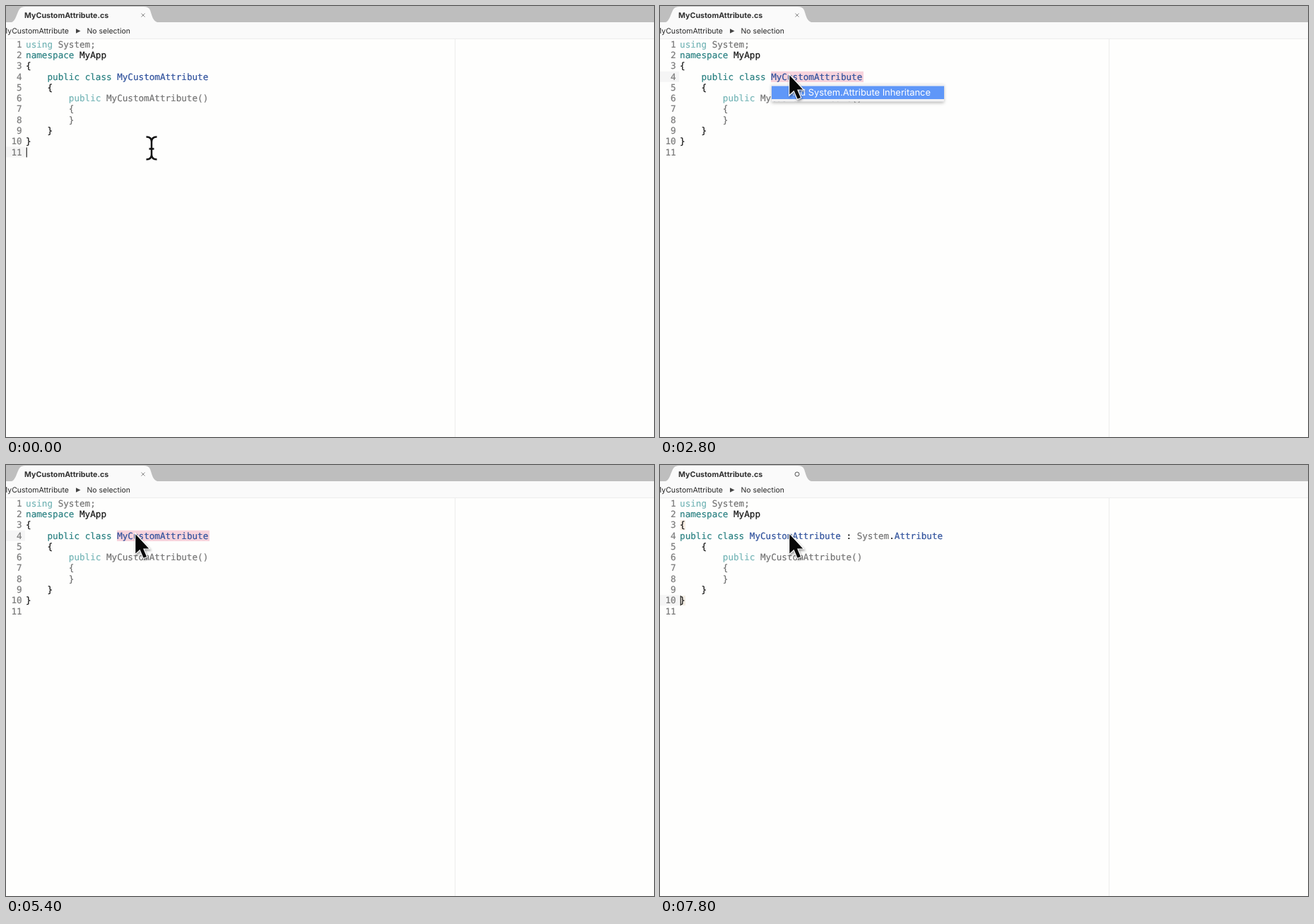
Recreate the animation shown at these times as an HTML page. Size 917 px wide and 611 px high, loop 8 s.

```html
<!DOCTYPE html>
<html lang="en">
<head>
<meta charset="utf-8">
<title>Code fix demo</title>
<style>
  html, body { margin: 0; width: 100%; height: 100%; overflow: hidden; background: #fefefd; }
  svg { display: block; width: 917px; height: 611px; }
  text { white-space: pre; text-rendering: geometricPrecision; font-family: Inter, "Open Sans", sans-serif; }
  .code { font: 12.62px "DejaVu Sans Mono", monospace; color: #161616; }
  .code, .code tspan { fill: currentColor; stroke: currentColor; stroke-width: .2px; }
  .small { font-size: 9.19px; }
  .num { color: #7b7b7b; text-anchor: end; }
  .key { color: #2a8182; }
  .type { color: #2f519c; }
  .dim, .code .dim { color: #747474; }
  .dim .key { color: #76b6b7; }
  .removed, .removed tspan { color: #94354b; }
  .added, .added tspan { color: #2f9436; }
  .end { text-anchor: end; }
</style>
</head>
<body>
<svg viewBox="0 0 917 611">
  <rect width="917" height="23" fill="#bebebe"/>
  <rect y="23" width="917" height="23" fill="#fafafa"/>
  <path d="M8 23C15 21 16 4 22 2Q24 1 27 1H195Q202 1 204 6C207 15 208 21 214 23z" fill="#fafafa"/>
  <path d="M0 46.5H917M635.5 47V611" stroke="#ececec"/>
  <text x="26" y="16.7" font-size="10.7" font-weight="700" fill="#303030">MyCustomAttribute.cs</text>
  <text class="end" x="89" y="39" font-size="10.5" fill="#262626">MyCustomAttribute</text>
  <path d="M99 32.3L105.5 35.5L99 38.7z" fill="#444"/>
  <text x="114.5" y="39" font-size="10.4" fill="#262626">No selection</text>
  <g id="stage"></g>
</svg>
<script>
const LOOP = 8000, STEP = 200;
const SELECT = 2200, MENU = 2800, PREVIEW = 3200, CLOSE = 5200, APPLY = 5800, FADE = 7000;
const stage = document.getElementById("stage");

const rect = (x, y, w, h, fill, extra = "") =>
  `<rect x="${x}" y="${y}" width="${w}" height="${h}" fill="${fill}" ${extra}/>`;
const text = (x, y, cls, s) => `<text x="${x}" y="${y}" class="${cls}">${s}</text>`;
const span = (cls, s) => `<tspan class="${cls}">${s}</tspan>`;
const lineY = n => 58.8 + 15.27 * (n - 1);

// Keywords come first, so that the markup of later spans is left alone.
const highlight = s => s
  .replace(/\b(using|namespace|public|class)\b/g, m => span("key", m))
  .replace(/\bMyCustomAttribute\b(?!\()/, m => span("type", m))
  .replace(/(System\.)(Attribute)/, (_, a, b) => a + span("type", b));

const OLD_CLASS = "    public class MyCustomAttribute";
const NEW_CLASS = "public class MyCustomAttribute : System.Attribute";
const source = cls => ["using System;", "namespace MyApp", "{", cls, "    {",
  "        public MyCustomAttribute()", "        {", "        }", "    }", "}"];

function editor(t) {
  const applied = t >= APPLY, selected = t >= SELECT && !applied;
  const active = applied ? 10 : selected ? 4 : 11;
  const unused = !applied || t >= FADE;
  let out = rect(0, lineY(active) - 12, 27, 15, "#f5f5f5");
  if (selected) out += rect(157, 92.7, 131, 15.3, "#f7d3dc");
  if (applied) out += rect(28.5, lineY(3) - 11, 7.5, 14, "#f8eee3") +
    rect(28.5, lineY(10) - 11, 7.5, 14, "#f3eee5");
  for (let n = 1; n <= 11; n++) out += text(22.6, lineY(n), "code num", n);
  source(applied ? NEW_CLASS : OLD_CLASS).forEach((s, i) => {
    const dim = i === 0 || (unused && i > 4 && i < 8);
    let line = highlight(s);
    if (applied && unused && i === 3) line = line.replace("System", span("dim", "System"));
    out += text(28.1, lineY(i + 1), dim ? "code dim" : "code", line);
  });
  const caret = t < SELECT || t >= FADE;
  if (caret) out += rect(28.6, lineY(active) - 11, 1.2, 14, "#222");
  return out;
}

function tabMark(t) {
  return t >= APPLY
    ? `<circle cx="194" cy="13" r="3" fill="none" stroke="#555"/>`
    : `<path d="M191.5 10.5l5 5m0-5l-5 5" stroke="#8a8a8a"/>`;
}

function menu() {
  return rect(158, 110.5, 244, 25, "#f1f1f3",
      `style="filter:drop-shadow(0 2px 2px #0004)" rx="1"`) +
    rect(158, 113.5, 244, 18.5, "#5f97f8") +
    `<text class="end" x="383" y="127.3" font-size="12.9" fill="#fff">Add System.Attribute Inheritance</text>`;
}

function preview() {
  const lines = source(OLD_CLASS);
  lines.splice(4, 0, NEW_CLASS);
  lines.push("}}");
  const added = [4, 11], removed = [3, 9, 10], pitch = 11.41;
  let out = rect(402.5, 52.5, 292, 150, "#fefefe", `rx="4" stroke="#ebebeb"`);
  lines.forEach((s, i) => {
    const kind = added.includes(i) ? "added" : removed.includes(i) ? "removed" : "";
    if (kind) out += rect(403, 54.2 + i * pitch, 291.5, pitch, kind === "added" ? "#eef7ee" : "#fbf6f7");
    out += text(412.4, 63.2 + i * pitch, "code small " + kind, highlight(s));
  });
  return out;
}

function beam(t) {
  const p = Math.min(1, Math.max(0, (t - 200) / 1200)), e = p * p * (3 - 2 * p);
  const d = "M-7.5-16Q0-16 0-9V9Q0 16-7.5 16M7.5-16Q0-16 0-9M0 9Q0 16 7.5 16M-3.5 1H3.5";
  return `<g transform="translate(${206 - 23 * e} ${201.5 - 102 * e})" fill="none">
    <path d="${d}" stroke="#fff" stroke-width="4.5"/><path d="${d}" stroke="#111" stroke-width="2.5"/></g>`;
}

function arrow() {
  return `<path d="M182.7 96.5V127L189.3 120.8L194.3 132.5L199.8 130.2L195 119H203.6z" fill="#080808"
    stroke="#fff" stroke-width="1.2" style="filter:drop-shadow(1px 2px 1.5px #0006)"/>`;
}

function draw(t) {
  let out = tabMark(t) + editor(t);
  if (t >= MENU && t < CLOSE) out += menu();
  if (t >= PREVIEW && t < CLOSE) out += preview();
  stage.innerHTML = out + (t < MENU ? beam(t) : arrow());
}

const start = performance.now();
let shown = -1;
function tick() {
  const t = Math.floor((performance.now() - start) % LOOP / STEP) * STEP;
  if (t !== shown) draw(shown = t);
  requestAnimationFrame(tick);
}
tick();
</script>
</body>
</html>
```
